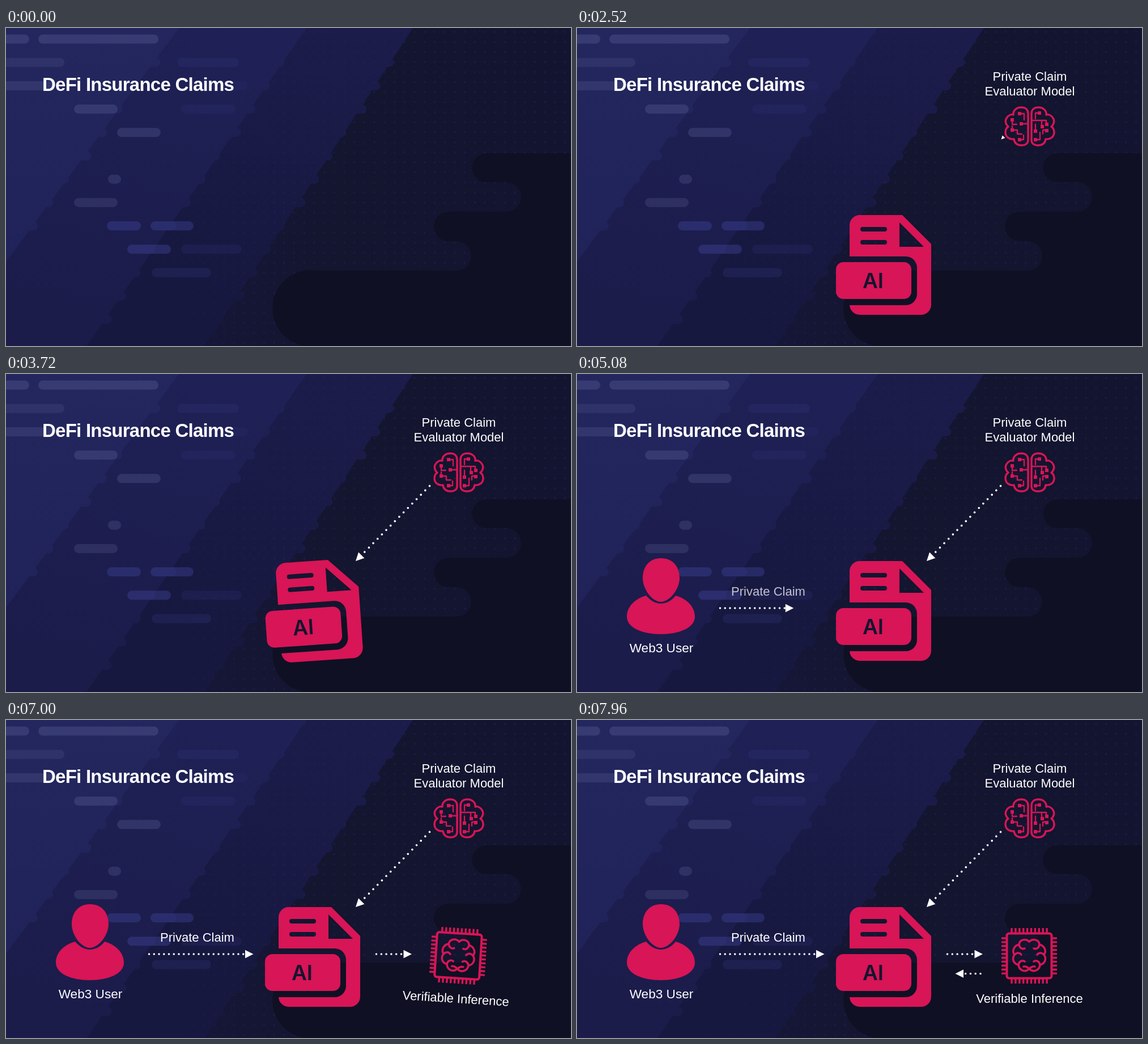
Animation of 997x561 px, one loop 8 s. Source, as an HTML page:

```html
<!DOCTYPE html>
<html lang="en">
<head>
<meta charset="utf-8">
<title>DeFi Insurance Claims</title>
<style>
  html, body { margin: 0; width: 100%; height: 100%; overflow: hidden; background: #13142f; }
  svg { display: block; width: 100%; height: 100%; }
  text { font: 22px "Liberation Sans", Arial, sans-serif; fill: #fff; text-anchor: middle; }
  .title { font-size: 33px; font-weight: bold; letter-spacing: -.75px; text-anchor: start; }
  .ai { font: 600 37px Inter, sans-serif; fill: #15142f; }
  .red { fill: #d81556; }
  .wire { fill: none; stroke: #d81556; stroke-linecap: round; stroke-linejoin: round; }
  .dots { stroke: #fff; stroke-width: 3.6; stroke-linecap: round; }
</style>
</head>
<body>
<svg viewBox="0 0 997 561" preserveAspectRatio="none">
  <defs>
    <linearGradient id="g0" x2="1" y2="0"><stop stop-color="#191a45"/><stop offset=".55" stop-color="#14152f"/><stop offset="1" stop-color="#13142f"/></linearGradient>
    <linearGradient id="g1" gradientUnits="userSpaceOnUse" x1="560" y1="0" x2="400" y2="480"><stop stop-color="#1b1c4a"/><stop offset="1" stop-color="#17183f"/></linearGradient>
    <linearGradient id="g2" gradientUnits="userSpaceOnUse" x1="330" y1="0" x2="200" y2="520"><stop stop-color="#1f2156"/><stop offset="1" stop-color="#1b1c4a"/></linearGradient>
    <linearGradient id="g3" gradientUnits="userSpaceOnUse" x1="0" y1="0" x2="20" y2="561"><stop stop-color="#23275e"/><stop offset="1" stop-color="#1f2157"/></linearGradient>
    <linearGradient id="fade"><stop offset=".15" stop-color="#000"/><stop offset=".5" stop-color="#fff"/></linearGradient>
    <mask id="dotMask"><rect width="997" height="561" fill="url(#fade)"/></mask>
    <pattern id="grid" width="17.7" height="17.7" patternUnits="userSpaceOnUse">
      <circle cx="13" cy="7" r="2" fill="#23245a" opacity=".42"/>
    </pattern>
  </defs>

  <rect width="997" height="561" fill="url(#g0)"/>
  <g id="layers"></g>
  <rect width="997" height="561" fill="url(#grid)" mask="url(#dotMask)"/>
  <path fill="#0f1024" d="M997 221H848a25.5 25.5 0 0 0 0 51H883a26 26 0 0 1 0 52H781a26 26 0 0 0 0 52H795a26 26 0 0 1 0 52H548A67 67 0 0 0 527 561H997Z"/>
  <g id="bars"></g>

  <text class="title" x="64" y="111">DeFi Insurance Claims</text>

  <g id="doc">
    <path id="page" class="red" fill-rule="evenodd"/>
    <rect class="red" x="457" y="413" width="133" height="65" rx="13"/>
    <text class="ai" x="522.5" y="459">AI</text>
  </g>

  <g id="model">
    <text x="799" y="93">Private Claim</text>
    <text x="799" y="119">Evaluator Model</text>
    <g class="wire" stroke-width="3.4">
      <path id="lobe" d="M796 151V198C796 204 791 207 785 207C777 207 772 203 771 196C763 197 756 192 756 184C756 179 758 176 761 174C756 170 755 163 758 159C761 154 766 152 770 153C769 146 775 140 784 140C791 140 796 144 796 151Z"/>
      <use href="#lobe" transform="translate(1598) scale(-1 1)"/>
      <path stroke-width="2.3" d="M782 151H789V162M768 162V170H776M784 169H795M768 180V173M770 180H777V187H785M781 197H788V189M816 150H809V160M803 163H828V169M820 174V163M809 181V170M829 180H822V187M809 197H817V184"/>
    </g>
    <path id="nodes" class="red"/>
  </g>

  <g id="user">
    <path class="red" d="M148 325C170 325 181 341 181 360C181 380 163 402 148 402S116 380 116 360C116 341 127 325 148 325ZM122 391C130 400 139 405 148 405S167 400 174 391C193 396 208 410 208 428C208 448 180 459 148 459S88 448 88 428C88 410 103 396 122 391Z"/>
    <text x="149" y="491" style="font-size:22.6px">Web3 User</text>
  </g>
  <text id="claim" x="337.5" y="391">Private Claim</text>

  <g id="chip">
    <g class="wire" stroke-width="4">
      <rect x="758.5" y="376.5" width="79" height="79" rx="4"/>
      <path id="pins" stroke-width="3.4" stroke-linecap="butt"/>
      <g id="half" stroke-width="3.6">
        <path d="M798 391C792 385 781 387 780 396C771 398 767 408 772 414C767 421 770 430 779 432C780 442 791 446 798 439"/>
        <path d="M780 396C781 402 785 405 790 403M772 414C776 410 781 410 784 414M779 432C780 426 785 423 790 426M798 439C795 436 792 434 788 435"/>
      </g>
      <use href="#half" transform="translate(1596) scale(-1 1)"/>
    </g>
    <text x="798.5" y="499">Verifiable Inference</text>
  </g>
  <g id="arrows"></g>
</svg>

<script>
const LOOP = 8000;
const $ = id => document.getElementById(id);
const clamp = v => Math.min(1, Math.max(0, v));
const span = (t, start, length) => clamp((t - start) / length);
const smooth = p => p * p * (3 - 2 * p);

function add(parent, tag, attrs) {
  const el = document.createElementNS("http://www.w3.org/2000/svg", tag);
  for (const k in attrs) el.setAttribute(k, attrs[k]);
  return parent.appendChild(el);
}

const rowY = row => 19.5 + row * 41.2;

// Diagonal layers, each with small rounded steps along its edge
[[718, 350, "g1"], [530, 142, "g2"], [305, -110, "g3"]].forEach(([top, bottom, id], n) => {
  const fill = `url(#${id})`;
  add($("layers"), "path", { fill, d: `M0 0H${top}L${bottom} 561H0Z` });
  for (let row = 1; row < 13; row++) {
    const y = rowY(row), edge = top + (bottom - top) * y / 561;
    const reach = 3 + (row * 5 + n * 3) % 4 * 3;
    if (edge > 20) add($("layers"), "rect", { x: edge - 60, y: y - 8, width: 60 + reach, height: 16, rx: 8, fill });
  }
});

// row, left, right, colour, opacity
const pale = "#7378b0", blue = "#4448a4";
[
  [0, -20, 41, pale, .25], [0, 57, 269, pale, .25],
  [1, -20, 103, pale, .15], [1, 302, 411, blue, .13],
  [2, -20, 86, pale, .2], [2, 320, 427, blue, .08],
  [3, 120, 197, pale, .24], [3, 309, 405, blue, .1],
  [4, 196, 273, pale, .23], [6, 180, 203, pale, .22],
  [7, 120, 197, pale, .2], [8, 178, 238, blue, .36], [8, 255, 331, blue, .36],
  [9, 214, 291, blue, .38], [9, 309, 416, blue, .13], [10, 257, 362, blue, .17]
].forEach(([row, x, end, fill, opacity]) =>
  add($("bars"), "rect", { x, y: rowY(row) - 8, width: end - x, height: 16, rx: 8, fill, opacity }));

const slot = y => `M504 ${y}H543a4 4 0 0 1 0 8H504a4 4 0 0 1 0-8Z`;
$("page").setAttribute("d",
  "M481 403V348a18 18 0 0 1 18-18H574L625 381V488a18 18 0 0 1-18 18H499a18 18 0 0 1-18-17H580a20 20 0 0 0 20-20V423a20 20 0 0 0-20-20Z" +
  "M569 343V386H612Z" + slot(351) + slot(374));

$("nodes").setAttribute("d",
  [[781, 151], [768, 162], [784, 169], [768, 180], [781, 197], [816, 150], [821, 174], [829, 170], [829, 181], [809, 182], [809, 197]]
    .map(([x, y]) => `M${x - 3} ${y - 3}h6v6h-6Z`).join(""));

let pins = "";
for (let i = 0; i < 10; i++) {
  const d = i * 6.9 - 31;
  pins += `M${798 + d} 367v9m0 80v9M749 ${416 + d}h9m80 0h9`;
}
$("pins").setAttribute("d", pins);

// Dotted arrow that grows from its tail
function arrow(x, y, tipX, tipY, gap, start, length) {
  const dx = tipX - x, dy = tipY - y, size = Math.hypot(dx, dy);
  const g = add($("arrows"), "g", { transform: `translate(${x} ${y}) rotate(${Math.atan2(dy, dx) * 180 / Math.PI})` });
  const line = add(g, "line", { class: "dots", "stroke-dasharray": `0 ${gap}` });
  const head = add(g, "path", { d: "M0 0L-14.5-7.2V7.2Z", fill: "#fff" });
  return t => {
    const p = span(t, start, length), tip = (size + 4) * p - 4;
    g.style.display = p > 0 ? "" : "none";
    line.style.display = tip > 15 ? "" : "none";
    line.setAttribute("x2", Math.max(0, tip - 15));
    head.setAttribute("transform", `translate(${tip}) scale(${Math.min(1, .35 + p * size / 25)})`);
  };
}
const arrows = [
  arrow(747.5, 197.5, 617, 330, 10.9, 2510, 800),
  arrow(252.5, 413, 436.5, 413, 8.75, 4540, 760),
  arrow(653.5, 413, 716, 413, 8.8, 6090, 820),
  arrow(712, 447.5, 667.5, 447.5, 8.8, 7735, 220)
];

function fade(id, t, start, length = 600) {
  $(id).setAttribute("opacity", smooth(span(t, start, length)));
}

function wobble(id, t, start, cx, cy) {
  const p = span(t, start, 800);
  const angle = 5.6 * Math.sin(p * 3 * Math.PI) * Math.sqrt(1 - p);
  $(id).setAttribute("transform", `rotate(${angle} ${cx} ${cy})`);
}

function draw(now) {
  const t = now % LOOP;
  fade("doc", t, 1055);
  fade("model", t, 1810);
  fade("user", t, 4100, 500);
  $("claim").setAttribute("opacity", span(t, 4540, 740));
  fade("chip", t, 5400, 640);
  wobble("doc", t, 3320, 541, 418);
  wobble("chip", t, 6938, 798, 415);
  arrows.forEach(step => step(t));
}

const begin = performance.now();
function frame() {
  draw(performance.now() - begin);
  requestAnimationFrame(frame);
}
frame();
</script>
</body>
</html>
```
